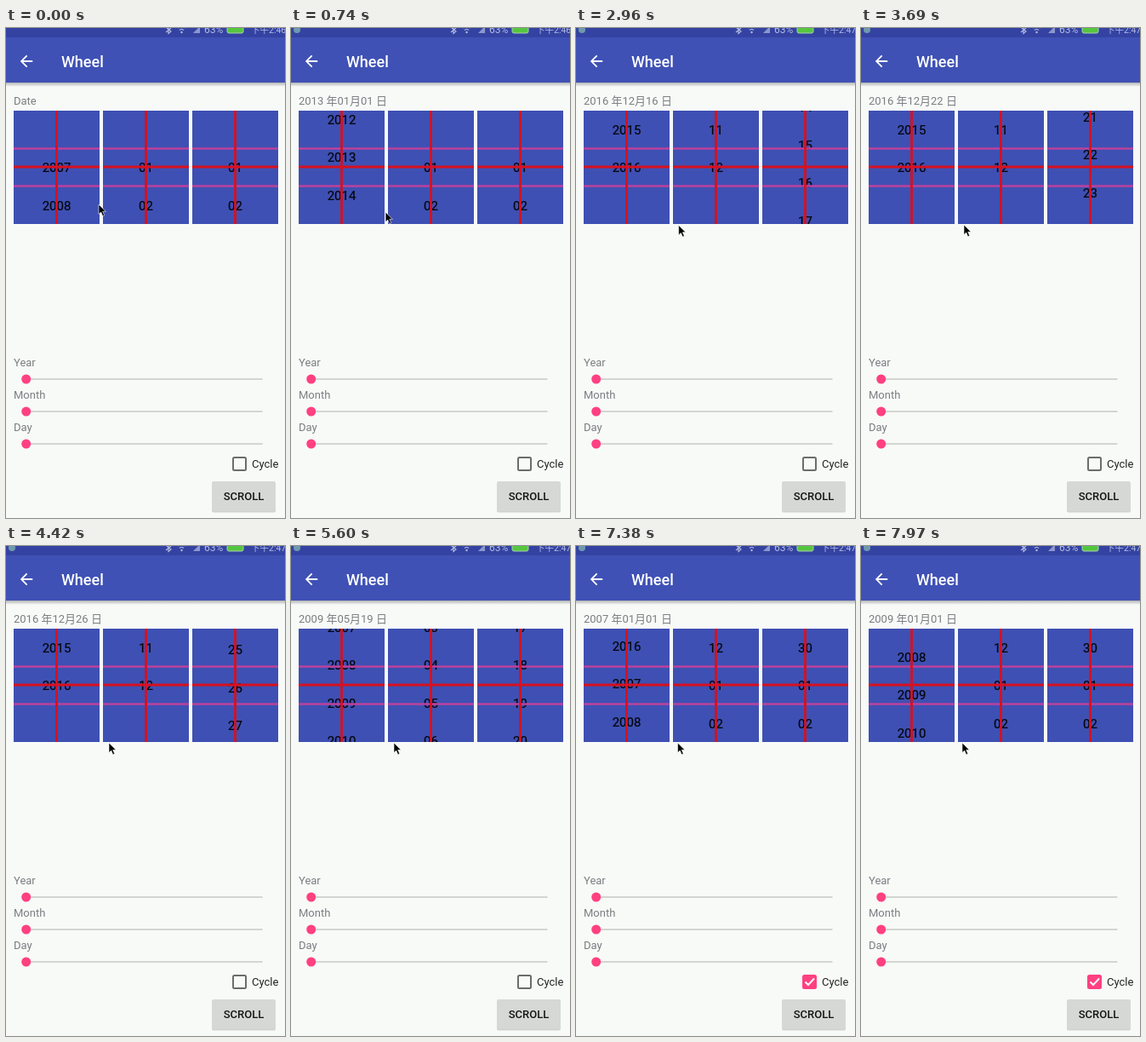
Recreate the animation shown at these times as an HTML page. Size 328x575 px, loop 8 s.

```html
<!DOCTYPE html>
<html lang="en">
<head>
<meta charset="utf-8">
<title>Wheel</title>
<style>
  html, body { margin: 0; width: 100%; height: 100%; overflow: hidden; background: #f8faf8; }
  svg { display: block; font-family: Roboto, "Noto Sans CJK SC", "Noto Sans CJK", sans-serif; }
  .label { font-size: 13px; fill: #7b7c80; }
  .item { font-size: 15px; fill: #05060c; stroke: #05060c; stroke-width: .2; text-anchor: middle; }
  .guide { stroke: #bb429c; stroke-width: 2.4; }
  .axis { stroke: #d8101f; stroke-width: 2.8; }
  .status { fill: #b3bae0; }
  .thin { fill: none; stroke: #b3bae0; stroke-width: 1.2; }
</style>
</head>
<body>
<svg id="stage" width="328" height="575" viewBox="0 0 328 575">
  <defs>
    <clipPath id="panel"><rect x="9" y="97" width="311" height="133"/></clipPath>
    <linearGradient id="shade" x2="0" y2="1">
      <stop stop-color="#000" stop-opacity=".28"/>
      <stop offset="1" stop-color="#000" stop-opacity="0"/>
    </linearGradient>
  </defs>
  <rect width="328" height="575" fill="#f8faf8"/>
  <rect width="328" height="64" fill="#3f51b5"/>
  <rect y="64" width="328" height="5" fill="url(#shade)"/>

  <g id="statusBar">
    <rect width="328" height="11" fill="#3443a2"/>
    <circle id="notice" cx="7" cy="2" r="4" fill="#6f9aac"/>
    <path class="thin" d="M188 -1l6 5-3 2.500v-9M188 5l6-5M202 0q4.500-4 9 0M204 2.500q2.500-2 5 0"/>
    <circle class="status" cx="206.500" cy="5" r="1.200"/>
    <path class="status" d="M220 6h8v-8z" opacity=".7"/>
    <text class="status" x="233" y="6" font-size="12">63%</text>
    <rect x="260" y="-3" width="19" height="9" rx="2" fill="#55c63f" stroke="#a8cfae"/>
    <text id="clock" class="status" x="288" y="6" font-size="10.500"></text>
  </g>

  <path fill="#fff" transform="translate(13.200 28.200) scale(.9)"
    d="M20 11H7.830l5.590-5.590L12 4l-8 8 8 8 1.410-1.410L7.830 13H20z"/>
  <text x="65" y="45.500" font-size="18" font-weight="500" fill="#fff">Wheel</text>
  <text id="date" class="label" x="9" y="89.500"></text>

  <g id="wheels" clip-path="url(#panel)"></g>
  <g id="sliders"></g>

  <rect id="box" x="267" y="504" width="15" height="15" rx="1.500" stroke-width="2"/>
  <path id="tick" d="M269.500 511.500l3.500 3.500 7-7.500" fill="none" stroke="#fff" stroke-width="2"/>
  <text x="289" y="516" font-size="13" fill="#222">Cycle</text>

  <rect x="242" y="533.500" width="75" height="35" rx="2" fill="#000" opacity=".16"/>
  <rect x="242" y="532" width="75" height="35" rx="2" fill="#d6d8d6"/>
  <text x="279.500" y="553.500" font-size="13" font-weight="500" fill="#151515" text-anchor="middle">SCROLL</text>

  <path id="cursor" d="M0 0v11.500l2.700-2.400 2 4.600 2-.9-2-4.500h3.600z" fill="#000" stroke="#fff" stroke-width=".6"/>
</svg>
<script>
const LOOP = 8000, STEP = 147.3, PITCH = 44.5, MIDDLE = 164;
const $ = id => document.getElementById(id);

function add(parent, tag, attrs, text = '') {
  const el = document.createElementNS('http://www.w3.org/2000/svg', tag);
  for (const name in attrs) el.setAttribute(name, attrs[name]);
  el.textContent = text;
  parent.append(el);
  return el;
}

// Piecewise linear value from [time, value] points.
function at(points, t) {
  const next = points.findIndex(p => p[0] > t);
  if (next === 0) return points[0][1];
  if (next < 0) return points[points.length - 1][1];
  const [t0, v0] = points[next - 1], [t1, v1] = points[next];
  return v0 + (v1 - v0) * (t - t0) / (t1 - t0);
}

const rewind = [[5230, 0], [5597, 7.45], [6400, 25]];
const cursorX = [[300, 109], [1750, 116], [2220, 116], [3000, 121], [7000, 121], [7500, 119]];
const cursorY = [[300, 207], [1750, 237], [2220, 237], [3000, 231]];

// Positions are item indexes; "first" is the number shown for index 0.
const wheels = [
  { x: 9, first: 2007, count: 10, moves: [[290, 0], [590, 4.5], [880, 8], [1030, 9]], last: [[7350, 0], [7954, 1.75]] },
  { x: 114, first: 1, count: 12, moves: [[1170, 0], [1480, 6.5], [1770, 10.7], [1910, 11]] },
  { x: 219, first: 1, count: 30, moves: [[2200, 0], [2650, 9], [3100, 17.5], [3400, 20.2], [3682, 21.33],
                                         [4000, 23.8], [4200, 24.6], [4419, 24.95], [4560, 25]] }
];

for (const wheel of wheels) {
  const { x } = wheel, mid = x + 50.5, g = $('wheels');
  add(g, 'rect', { x, y: 97, width: 101, height: 133, fill: '#3e50b3' });
  wheel.items = Array.from({ length: 5 }, () => add(g, 'text', { class: 'item', x: mid }));
  for (const y of [141.5, 185.5]) add(g, 'path', { class: 'guide', d: `M${x} ${y}h101` });
  add(g, 'path', { class: 'axis', d: `M${x} 163h101M${mid} 97v133` });
}

['Year', 'Month', 'Day'].forEach((name, i) => {
  const y = 412 + 38 * i, g = $('sliders');
  add(g, 'text', { class: 'label', x: 9, y: y - 15.5 }, name);
  add(g, 'path', { d: `M24 ${y}h277.500`, stroke: '#d3d5d3', 'stroke-width': 2 });
  add(g, 'circle', { cx: 23.7, cy: y, r: 5.5, fill: '#ff4081' });
});

const pad = n => String(n).padStart(2, '0');

function drawWheel({ first, count, moves, last, items }, t, cycle) {
  let pos = Math.max(0, at(moves, t) - at(rewind, t));
  if (last && t > 7000) pos = at(last, t);
  const near = Math.round(pos);
  items.forEach((item, i) => {
    const index = near + i - 2;
    const shown = cycle || (index >= 0 && index < count);
    item.textContent = shown ? pad(first + (index + count) % count) : '';
    item.setAttribute('y', MIDDLE + 5.3 + (index - pos) * PITCH);
  });
  return pad(first + near);
}

function draw(now) {
  const t = Math.floor(now % LOOP / STEP + 1e-6) * STEP;
  const cycle = t > 7000;
  const [year, month, day] = wheels.map(wheel => drawWheel(wheel, t, cycle));
  $('date').textContent = t < 400 ? 'Date' : `${year} 年${month}月${day} 日`;
  $('clock').textContent = t < 2600 ? '下午2:46' : '下午2:47';
  $('notice').style.opacity = t < 100 ? 0 : 1;
  $('box').setAttribute('fill', cycle ? '#ff4081' : 'none');
  $('box').setAttribute('stroke', cycle ? '#ff4081' : '#6b6c6b');
  $('tick').style.opacity = cycle ? 1 : 0;
  $('cursor').setAttribute('transform', `translate(${at(cursorX, t)} ${at(cursorY, t)})`);
}

const start = performance.now();
function frame() {
  draw(performance.now() - start);
  requestAnimationFrame(frame);
}
frame();
</script>
</body>
</html>
```
